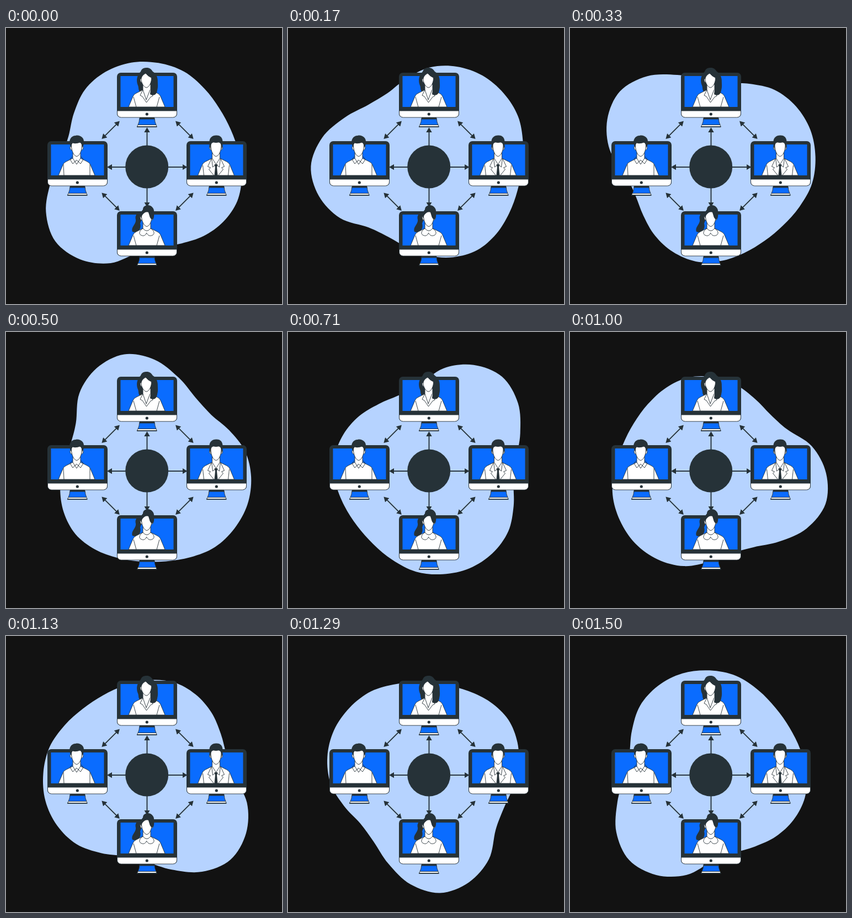
An HTML page that plays this animation: 500 px wide and 500 px high, repeating every 1540 ms.

```html
<!DOCTYPE html>
<html lang="en">
<head>
<meta charset="utf-8">
<title>Peer network</title>
<style>
  html, body { margin: 0; width: 100%; height: 100%; overflow: hidden; background: #121212; }
  svg { display: block; width: 100%; height: 100%; }
  .dark { fill: #263238; }
  .blue { fill: #0a6cff; }
  .white { fill: #fff; stroke: #263238; stroke-width: .9; stroke-linejoin: round; }
  .line { fill: none; stroke: #263238; stroke-width: .9; stroke-linejoin: round; }
  .arrows { fill: none; stroke: #263238; stroke-width: 1.9; }
  .arrows path { marker-end: url(#head); }
  .arrows .double { marker-start: url(#head); }
</style>
</head>
<body>
<svg viewBox="0 0 500 500">
  <defs>
    <marker id="head" markerUnits="userSpaceOnUse" markerWidth="9" markerHeight="10.4" refX=".5" refY="5.2" orient="auto-start-reverse">
      <path class="dark" style="marker: none" d="M0 0L9 5.2L0 10.4Z"/>
    </marker>
    <g id="monitor">
      <path class="blue" d="M41 82H68Q68.5 90 71 94.5H38Q40.5 90 41 82Z" stroke="#263238" stroke-width=".9"/>
      <path class="dark" d="M41 81H68V84.5H41Z"/>
      <path class="white" d="M38 94.5H71L72 97.8H36.5Z"/>
      <path class="dark" d="M36 97H72.5V98.8H36Z"/>
      <rect class="dark" width="109" height="81" rx="7"/>
      <path class="white" d="M.5 69H108.5V74a7 7 0 0 1-7 7H7.5a7 7 0 0 1-7-7Z"/>
      <rect class="blue" x="6.5" y="6" width="96" height="56"/>
      <circle class="dark" cx="54.3" cy="75" r="2.6"/>
    </g>
    <!-- Bust and face are centred on x = 0, with the screen's lower edge at y = 0. -->
    <path id="bust" class="white" d="M-33 0L-25 -19Q-23.5 -23 -19 -25L-7 -31V-41H7V-31L19 -25Q23.5 -23 25 -19L33 0Z"/>
    <path id="face" class="white" d="M-9.5 -54C-9.5 -59 -5 -61 0 -61S9.5 -59 9.5 -54C9.5 -43 4 -34.5 0 -34.5S-9.5 -43 -9.5 -54Z"/>
    <path id="ears" class="white" d="M-9 -53C-14 -55 -12 -45 -8.5 -46ZM9 -53C14 -55 12 -45 8.5 -46Z"/>
  </defs>

  <path id="blob" fill="#b6d3ff"/>

  <g class="arrows">
    <path d="M255.5 214V188.5"/>
    <path d="M255.5 289V316"/>
    <path d="M218 252H191.5"/>
    <path d="M292 252H320"/>
    <path class="double" d="M179.4 195.1L199.9 174.6"/>
    <path class="double" d="M313.1 174.6L333.6 195.1"/>
    <path class="double" d="M179.4 304.4L199.9 324.9"/>
    <path class="double" d="M313.1 324.9L333.6 304.4"/>
  </g>
  <circle class="dark" cx="255.2" cy="251.5" r="39"/>

  <use href="#monitor" x="201" y="81"/>
  <use href="#monitor" x="75" y="205"/>
  <use href="#monitor" x="327" y="205"/>
  <use href="#monitor" x="201" y="332"/>

  <g transform="translate(255 143)">
    <path class="dark" d="M-1 -71C-8 -71 -10 -67 -11 -64C-19 -57 -19 -46 -16 -39C-14 -34 -16 -31 -12 -27L10 -23L19 -40C22 -52 17 -61 11 -64C8 -69 4 -71.5 -1 -71Z"/>
    <use href="#bust"/>
    <path class="line" d="M-7 -31L-12 -21L-8 -19L-.5 -8L7 -18L11 -20L7 -31M-7 -31L-1 -13L6 -31M-24 -18L-19 0M23 -18L18 0"/>
    <path class="dark" d="M8 -50C11 -42 7 -34 6 -23C12 -19 18 -22 19 -30C22 -41 19 -53 13 -60Z"/>
    <path class="white" d="M-9 -51C-14 -53 -12 -44 -8.5 -44Z"/>
    <path class="white" d="M-10 -51C-9 -57 -5 -59 -2 -61Q3 -55 8.5 -53C9 -43 3 -35 -.5 -35S-10 -42 -10 -51Z"/>
  </g>

  <g transform="translate(128 267)">
    <use href="#bust"/>
    <path class="line" d="M-8 -34L-12 -29L-7 -21L0 -28L7 -21L12 -29L8 -34M-7 -31L0 -20L7 -31M-24 -20L-23 0M24 -20V0"/>
    <use href="#ears"/>
    <use href="#face"/>
    <path class="dark" d="M-10 -50L-12 -55C-15 -64 -10 -72 -2 -72C6 -74 13 -68 13 -62Q14 -57 10.5 -50Q10 -57 7 -60Q-2 -56 -8 -59Q-10 -55 -10 -50Z"/>
  </g>

  <g transform="translate(380.5 267)">
    <use href="#bust"/>
    <path class="line" d="M-8 -31L-15 -16L-10 -14L-13 -11L-4 0M8 -31L15 -16L10 -14L13 -11L4 0M-7 -31L0 -20L7 -31M-8 -31L-6 -15L0 -20L6 -15L8 -31M-24 -18L-22 0M24 -18L22 0"/>
    <path class="dark" d="M-3 -20H3L1.5 -15L3 0H-3L-1.5 -15Z"/>
    <use href="#ears"/>
    <use href="#face"/>
    <path class="dark" d="M-10 -47L-12 -53V-61C-12 -68 -7 -72.5 0 -72.5C8 -73 12 -68 12 -61V-53L10 -47Q10 -55 8 -61Q0 -57 -8 -61Q-10 -55 -10 -47Z"/>
  </g>

  <g transform="translate(255 394)">
    <path class="dark" d="M-9 -60C-17 -61 -22 -55 -20 -47C-19 -38 -29 -34 -26 -25C-16 -21 -9 -30 -12 -40Q-9 -46 -9 -52Z"/>
    <use href="#bust"/>
    <path class="line" d="M-7 -31C-13 -27 -15 -22 -11 -19C-6 -16 -2 -18 -.5 -23C2 -18 6 -16 11 -19C15 -22 13 -27 7 -31M-7 -31Q0 -22 7 -31M-24 -18L-19 0M23 -18L18 0"/>
    <use href="#ears"/>
    <use href="#face"/>
    <path class="dark" d="M-10 -49C-13 -56 -10 -62 -7 -65C-7 -71 -2 -73 3 -73C10 -72 14 -66 13 -60C14 -55 13 -49 10 -47C5 -48 5 -56 2 -62C-5 -60 -9 -56 -10 -49Z"/>
  </g>
</svg>
<script>
const LOOP = 1540, STEP = 1000 / 24, TURN = 1530, CX = 256.5, CY = 251.3;
const blob = document.getElementById("blob");

// Blob radius every 15 degrees, clockwise from the right, with the bulge pointing left.
const radii = [167.5, 165, 167, 171.5, 174, 169.5, 161.5, 152, 147.5, 156, 187, 207.5,
  215, 201.5, 177.5, 158, 153.5, 165, 180, 188, 191, 189, 184.5, 175];
const START_ANGLE = -39;

function smoothPath(points) {
  const at = i => points[(i + points.length) % points.length];
  let d = `M${points[0]}`;
  points.forEach((p, i) => {
    const before = at(i - 1), next = at(i + 1), after = at(i + 2);
    const out = p.map((v, k) => v + (next[k] - before[k]) / 6);
    const into = next.map((v, k) => v - (after[k] - p[k]) / 6);
    d += `C${out} ${into} ${next}`;
  });
  return d + "Z";
}

blob.setAttribute("d", smoothPath(radii.map((r, i) => {
  const a = i * 2 * Math.PI / radii.length;
  return [CX + r * Math.cos(a), CY + r * Math.sin(a)];
})));

// The turn advances in 24 steps a second; the small lead covers rounded step times.
function draw(now) {
  const step = Math.min(36, Math.floor((now % LOOP + 4) / STEP));
  blob.setAttribute("transform", `rotate(${START_ANGLE + step * STEP * 360 / TURN} ${CX} ${CY})`);
}

function tick() {
  draw(performance.now());
  requestAnimationFrame(tick);
}
tick();
</script>
</body>
</html>
```
